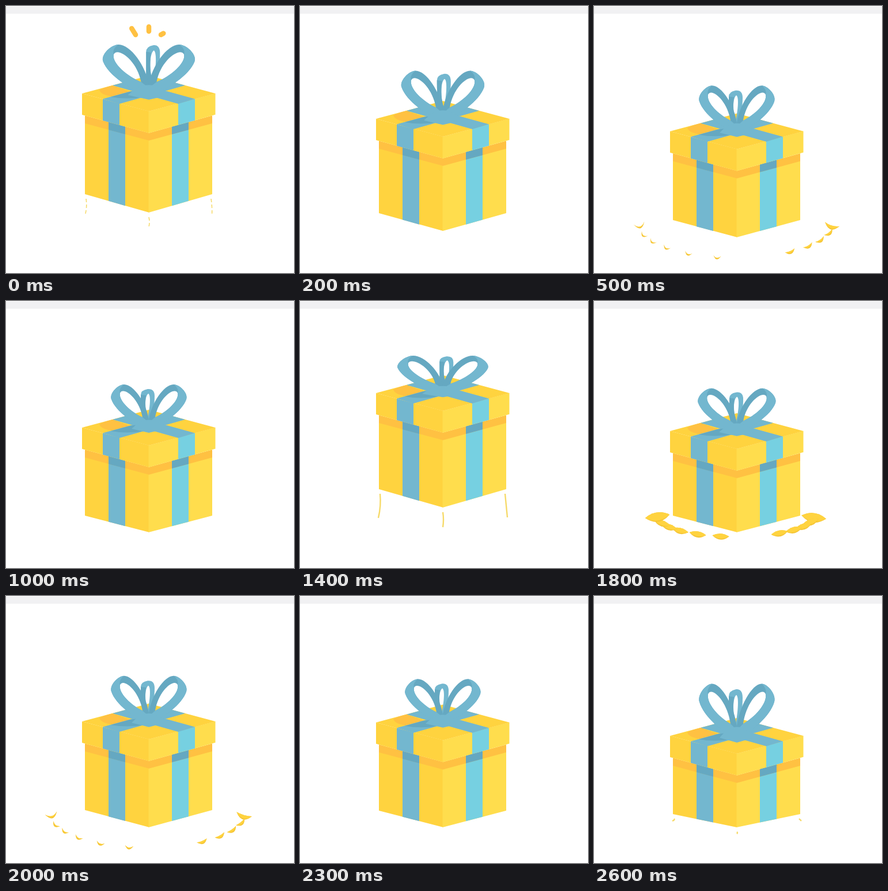
An HTML page with a canvas for the animation above (2700 ms loop, 500x464 px).

```html
<!DOCTYPE html>
<html lang="en">
<head>
<meta charset="utf-8">
<title>Jumping gift box</title>
<style>
  html, body { margin: 0; width: 100%; height: 100%; overflow: hidden; background: #fff; }
  canvas { display: block; }
</style>
</head>
<body>
<canvas id="stage" width="500" height="464"></canvas>
<script>
const ctx = document.getElementById('stage').getContext('2d');
const LOOP = 2700, STEP = 100, JUMP = 1520;
const YELLOW = '#ffd33f', LIGHT = '#ffdd4d', ORANGE = '#ffc142';
const BLUE = '#73b7cf', CYAN = '#76d0e1', DARK = '#65a8c1';

// phase, lid height, body bottom (middle), body bottom (sides), bow scale x, bow scale y
const POSES = [
  [0, 152, 359, 327, 1.22, 1.14],
  [100, 155, 363, 331, 1.2, 1.22],
  [200, 196, 391, 360, 1.1, 1.12],
  [280, 226, 402, 373, 1.03, 0.99],
  [340, 228, 402, 374, 1.01, 0.98],
  [480, 218, 402, 372, 1, 1.06],
  [560, 217, 402, 372, 1, 1.07],
  [800, 220, 402, 373, 1, 1],
  [1000, 220, 402, 373, 1, 1],
  [1080, 243, 402, 379, 1, 1.22],
  [1190, 249, 402, 380, 1, 1.1],
  [1300, 210, 386, 355, 1.1, 0.9],
  [1400, 160, 359, 327, 1.2, 0.86],
  [JUMP, 152, 359, 327, 1.22, 1.14]
];

const clamp = v => Math.max(0, Math.min(1, v));

function poseAt(phase) {
  const i = POSES.findIndex(p => p[0] > phase);
  const a = POSES[i - 1], b = POSES[i];
  const k = (phase - a[0]) / (b[0] - a[0]);
  return a.map((v, j) => v + (b[j] - v) * k);
}

function shape(color, d) {
  ctx.fillStyle = color;
  ctx.fill(new Path2D(d), 'evenodd');
}

// A V-shaped edge of the box: y at any x
const edge = (side, mid, half) => x => mid - (mid - side) * Math.abs(x - 247.5) / half;

function face(color, x0, x1, top, bottom) {
  shape(color, `M${x0},${top(x0)}L${x1},${top(x1)}L${x1},${bottom(x1)}L${x0},${bottom(x0)}Z`);
}

function wrapped(left, right, top, bottom, strips, colors) {
  face(colors[0], left, 248, top, bottom);
  face(colors[1], 247.5, right, top, bottom);
  face(colors[2], strips[0], strips[0] + 29, top, bottom);
  face(colors[3], strips[1], strips[1] + 29, top, bottom);
}

function drawBox(lid, bottom, side) {
  const lidTop = edge(lid, lid + 31, 115.5);
  const lidBottom = edge(lid + 37, lid + 69, 115.5);
  const shade = edge(lid + 52, lid + 82, 110.5);
  const faces = [YELLOW, LIGHT, BLUE, CYAN];
  wrapped(137, 358, lidBottom, edge(side, bottom, 110.5), [178, 288], faces);
  wrapped(137, 358, lidBottom, shade, [178, 288], [ORANGE, ORANGE, DARK, DARK]);
  wrapped(132, 363.5, lidTop, lidBottom, [168, 299], faces);

  ctx.save();
  ctx.translate(0, lid);
  shape(YELLOW, 'M132,0L248,-31L363.5,0L248,31Z');
  shape(ORANGE, 'M162,-6Q172,-11 185,-14L215,-3L184,5Q165,3 162,-6Z');
  shape(BLUE, 'M168,9.5L282,-22L311,-14L197,18Z');
  shape(BLUE, 'M185,-14L214,-22L328,9.5L299,18Z');
  shape(DARK, 'M182,6L215,-3L250,-8L240,6Q210,11 182,6Z');
  ctx.restore();
}

function drawLoop(mirror) {
  ctx.save();
  ctx.scale(mirror, 1);
  shape(DARK, 'M0,4C-25,0 -58,-25 -65,-45C-69,-56 -53,-71 -43,-71C-26,-71 -4,-38 0,-10Z' +
    'M-11,-14C-31,-23 -53,-43 -50,-56C-45,-68 -17,-48 -11,-14Z');
  shape(BLUE, 'M0,6C-25,0 -58,-25 -65,-45C-69,-56 -53,-71 -43,-71' +
    'C-48,-68 -52,-62 -50,-56C-53,-43 -31,-23 -11,-14L0,-5Z');
  ctx.restore();
}

function drawBow(lid, sx, sy) {
  const lift = (sx - 1) / 0.22;
  const x = -2 + 8 * lift, top = -63 - 7 * lift, w = 12 / sx;
  ctx.save();
  ctx.translate(248, lid - 4);
  ctx.scale(sx, sy);
  shape(BLUE, `M-4,-4C${x - w},-25 ${x - w},-40 ${x - w},${top + 10}Q${x - w},${top + 2} ${x},${top}` +
    `Q${x + w},${top - 1} ${x + w},${top + 12}C${x + w},-35 ${x + w - 3},-20 4,-4Z` +
    `M${x},-14C${x - 6},-30 ${x - 5},${top + 12} ${x + 1},${top + 8}C${x + 6},${top + 10} ${x + 4},-30 ${x},-14Z`);
  shape(DARK, `M-4,-4C${x - w},-25 ${x - w},-40 ${x - w},${top + 10}L${x - 3},${top + 11}` +
    `C${x - 5},-40 ${x - 4},-24 ${x},-14L0,-4Z`);
  drawLoop(1);
  drawLoop(-1);
  shape(BLUE, 'M-20,-3Q0,-16 20,-3L30,6L0,13L-30,6Z');
  ctx.restore();
}

function drawSparks(phase) {
  const age = phase > JUMP / 2 ? phase - JUMP : phase;
  if (age < -60 || age > 180) return;
  const size = age < 0 ? 1 + age / 60 : 1 - age / 180;
  const shift = age * 0.14;
  ctx.strokeStyle = ORANGE;
  ctx.lineCap = 'round';
  ctx.lineWidth = 4 + 4.5 * size;
  for (const [x, y, dx, dy, length] of [[225, 50, -0.52, -0.85, 13], [248, 44, 0, -1, 8], [269, 50, 0.86, -0.5, 5]]) {
    const far = shift + length * (0.3 + 0.7 * size);
    ctx.beginPath();
    ctx.moveTo(x + dx * shift, y + dy * shift);
    ctx.lineTo(x + dx * far, y + dy * far);
    ctx.stroke();
  }
}

function drawTrails(phase, bottom, side) {
  const age = phase < JUMP / 2 ? phase + JUMP : phase;
  if (age < 1070 || age > 1600) return;
  const rise = clamp((age - 1070) / 200), fade = clamp((age - 1400) / 200);
  ctx.strokeStyle = '#f6da69';
  ctx.lineCap = 'butt';
  ctx.lineWidth = 2.4 - 1.4 * fade;
  ctx.setLineDash(fade > 0.1 ? [6, 4] : []);
  for (const [x, y, length, bend] of [[139, side, 40, -3], [248, bottom, 24, 0], [356, side, 39, 4]]) {
    const start = y + 8, end = start + 2 + length * rise * (1 - 0.65 * fade);
    ctx.beginPath();
    ctx.moveTo(x, start);
    ctx.quadraticCurveTo(x + 2, (start + end) / 2, x + bend * (1 - fade), end);
    ctx.stroke();
  }
  ctx.setLineDash([]);
}

function drawPuffs(phase) {
  if (phase < 240 || phase > 620) return;
  const spread = clamp((phase - 280) / 200);
  const grow = 1 - (1 - spread) ** 2;
  const rx = 136 + 32 * grow, ry = 36 + 24 * grow;
  for (const degrees of [4, 17, 30, 42, 56, 101, 119, 135, 148, 160, 178]) {
    const angle = degrees * Math.PI / 180, left = degrees > 90;
    const worn = clamp((phase - 270) / (left ? 245 : 340));
    if (worn === 1) continue;
    const outer = Math.abs(Math.cos(angle)) > 0.99;
    const length = (outer ? 22 : 15) * (1 - 0.6 * worn);
    const height = outer ? 15 : 9;
    ctx.save();
    ctx.translate(246 + rx * Math.cos(angle), 373 + 2 * grow + ry * Math.sin(angle));
    ctx.rotate((left ? 0.35 : -0.35) * Math.abs(Math.cos(angle)) * (1 + grow) * (outer ? -0.4 : 1));
    const inner = -height + 2 * height * worn;
    shape('#f5c535', `M${-length},0Q0,${height + 4} ${length},0Q0,${inner} ${-length},0Z`);
    shape(YELLOW, `M${-length},0Q0,${height} ${length},0Q0,${inner} ${-length},0Z`);
    ctx.restore();
  }
}

function draw(now) {
  const time = Math.floor(now % LOOP / STEP) * STEP;
  const phase = time % JUMP;
  const [, lid, bottom, side, sx, sy] = poseAt(phase);
  ctx.fillStyle = '#fff';
  ctx.fillRect(0, 0, 500, 464);
  ctx.fillStyle = '#f1f1f3';
  ctx.fillRect(0, 1, 500, 12.5);
  drawPuffs(phase);
  drawTrails(phase, bottom, side);
  drawBox(lid, bottom, side);
  drawBow(lid, sx, sy);
  drawSparks(phase);
  requestAnimationFrame(draw);
}

requestAnimationFrame(draw);
</script>
</body>
</html>
```
